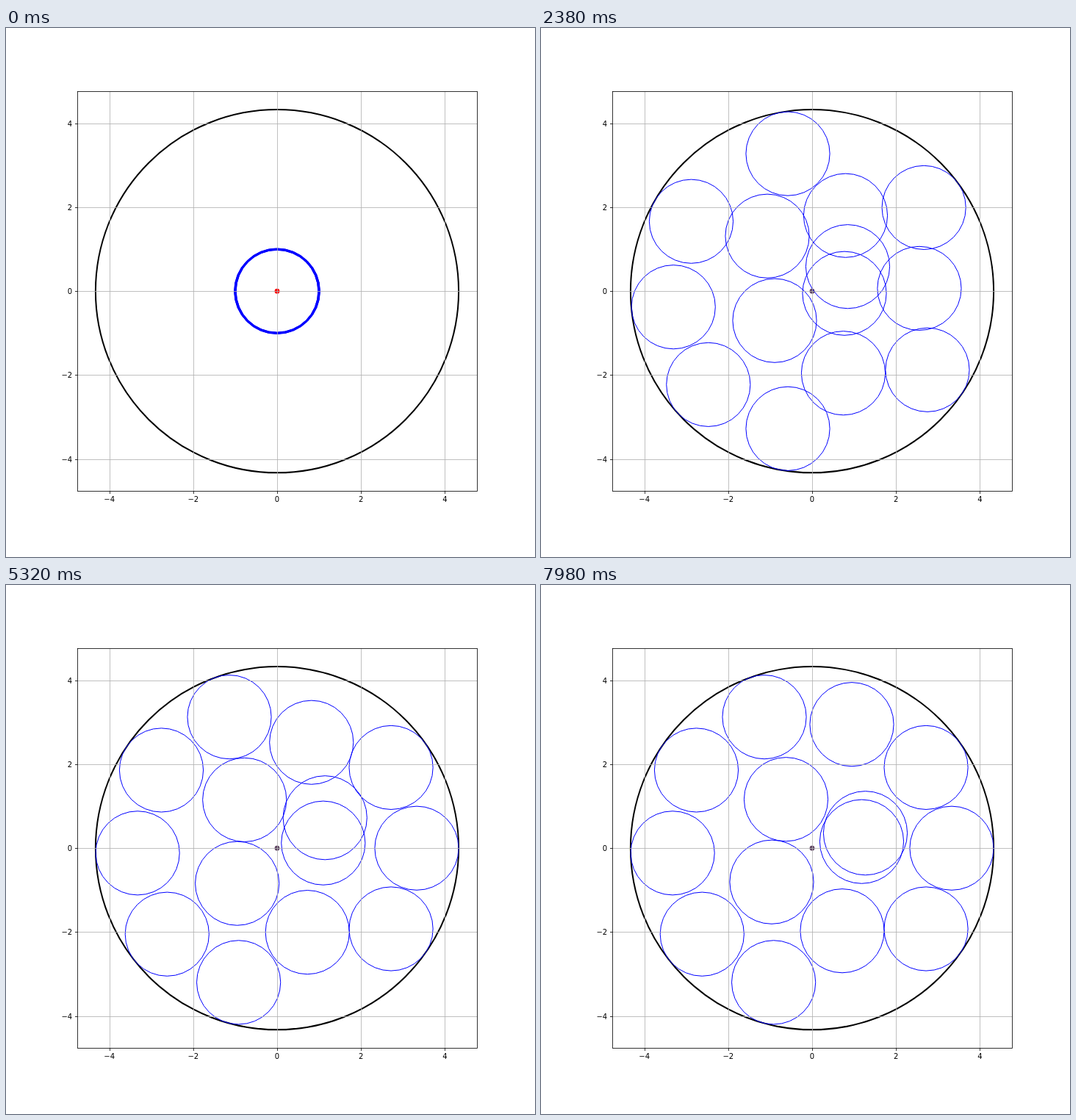
These frames come from a looping animation (720 by 720 pixels, 8000 ms). An HTML page:

```html
<!DOCTYPE html>
<html lang="en">
<head>
<meta charset="utf-8">
<title>Packing circles</title>
<style>
  html, body { margin: 0; width: 100%; height: 100%; overflow: hidden; background: #fff; }
  svg { display: block; width: 720px; height: 720px; }
  text { font: 10px "DejaVu Sans", sans-serif; }
  circle { fill: none; }
  .grid { stroke: #b0b0b0; stroke-width: .8; }
  .axis { stroke: #000; stroke-width: .8; fill: none; }
</style>
</head>
<body>
<svg viewBox="0 0 720 720">
  <g transform="translate(369 358.2)">
    <circle id="dot" r="3.4"/>
    <circle r="247.1" stroke="#000" stroke-width="2"/>
    <g id="discs" stroke="#00f"></g>
  </g>
  <g id="axes"></g>
</svg>
<script>
const STEP = 140, LOOP = 8000, CX = 369, CY = 358.2, UNIT = 57.09, RIM = 190;
const BURST = 7, SQUEEZE = 17;

const byId = id => document.getElementById(id);
const clamp01 = f => Math.min(1, Math.max(0, f));
const smooth = f => f * f * (3 - 2 * f);
const easeOut = f => 1 - (1 - f) ** 1.6;

// Rim discs fly straight out, then turn by `slack` degrees into an evenly spaced slot.
const rimDisc = (slot, slack, speed = 195, dip = 0) => s => {
  const turn = slack * (1 - smooth(clamp01((s - SQUEEZE) / 15)));
  const angle = (slot + turn) * Math.PI / 180;
  const reach = Math.min(RIM, Math.max(1.3, speed * (s / BURST) ** .75));
  const r = reach - dip * Math.exp(-(((s - SQUEEZE) / 3) ** 2));
  return [r * Math.cos(angle), -r * Math.sin(angle)];
};

// Inner discs ease through a few points, given as offsets from the middle.
const stops = [0, BURST, SQUEEZE, 48, 57];
const innerDisc = (...points) => s => {
  const path = [[0, 0], ...points];
  const k = Math.max(1, stops.findIndex(stop => stop >= s));
  const f = easeOut((s - stops[k - 1]) / (stops[k] - stops[k - 1]));
  return path[k].map((v, axis) => path[k - 1][axis] + (v - path[k - 1][axis]) * f);
};

const left = k => 182 + 36 * k, right = k => 35.3 * k;
const places = [
  rimDisc(left(-2), -10),
  rimDisc(left(-1), 4),
  rimDisc(left(0), 4.5, 139),
  rimDisc(left(1), 4),
  rimDisc(left(2), 6, 182),
  rimDisc(right(-1), 1),
  rimDisc(right(0), 1.5, 134, 44),
  rimDisc(right(1), 1.5),
  innerDisc([-61, -88], [-61, -75], [-41, -64], [-35.5, -66.5]),
  innerDisc([48.5, -107], [45.5, -103], [47, -152], [54, -168.5]),
  innerDisc([48.5, -38], [48.5, -33.5], [68.5, -43], [72.5, -20.5]),
  innerDisc([37.5, -7.5], [44, 3], [66.5, -9], [67.5, -9]),
  innerDisc([-20, 7.5], [-51, 40], [-55, 49.5], [-55, 46]),
  innerDisc([50, 79.5], [42.5, 111.5], [41, 115], [41, 112.5])
];

byId('discs').innerHTML = `<circle r="${UNIT}"/>`.repeat(places.length);
const discs = [...byId('discs').children];

const line = (cls, x1, y1, x2, y2) =>
  `<line class="${cls}" x1="${x1}" y1="${y1}" x2="${x2}" y2="${y2}"/>`;
const label = (x, y, anchor, v) =>
  `<text x="${x}" y="${y}" text-anchor="${anchor}">${String(v).replace('-', '\u2212')}</text>`;

let axes = '';
for (let v = -4; v <= 4; v += 2) {
  const x = Math.round(CX + v * UNIT) + .5, y = Math.round(CY - v * UNIT) + .5;
  axes += line('grid', x, 86.5, x, 630.5) + line('grid', 97.5, y, 641.5, y)
    + line('axis', x, 630.5, x, 634) + line('axis', 94, y, 97.5, y)
    + label(CX + v * UNIT, 645, 'middle', v) + label(90.2, y + 3.5, 'end', v);
}
byId('axes').innerHTML = axes + '<rect class="axis" x="97.5" y="86.5" width="544" height="544"/>';

function draw(now) {
  const s = Math.floor(now % LOOP / STEP);
  discs.forEach((disc, i) => {
    const [x, y] = places[i](s);
    disc.setAttribute('cx', x);
    disc.setAttribute('cy', y);
  });
  byId('dot').style.fill = s ? '#5f4462' : '#f00';
  requestAnimationFrame(draw);
}
draw(0);
</script>
</body>
</html>
```
